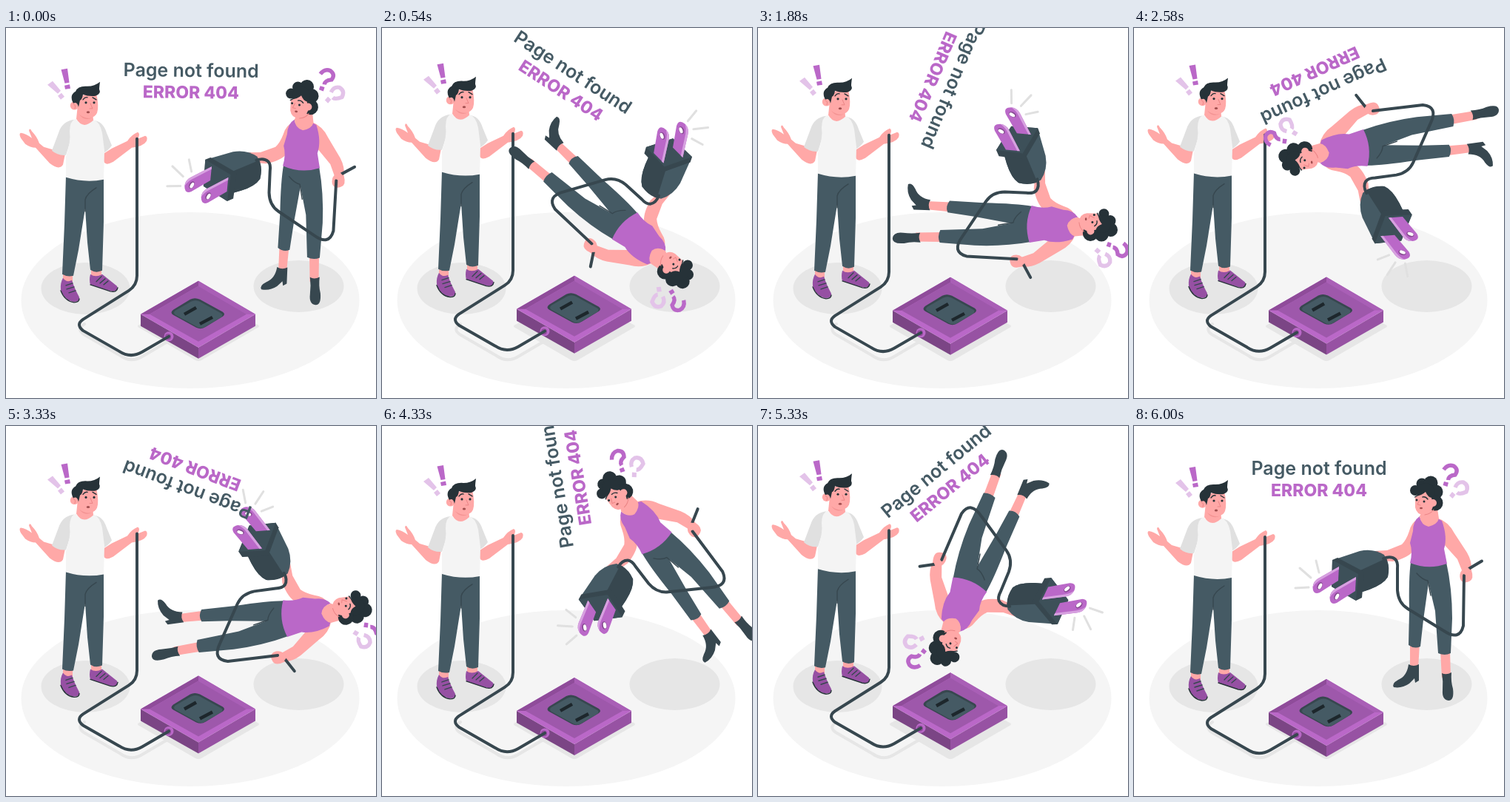
Recreate the animation shown at these times as an HTML page. Size 500 by 500 pixels, loop 6040 ms.

```html
<!DOCTYPE html>
<html lang="en">
<head>
<meta charset="utf-8">
<title>Page not found</title>
<style>
  html, body { margin: 0; width: 100%; height: 100%; overflow: hidden; background: #fff; }
  svg { display: block; width: 100%; height: 100%; }
  text { font-family: Inter, Roboto, sans-serif; text-anchor: middle; }
  .skin { fill: #ffa8a7; }
  .hair { fill: #263238; }
  .slate { fill: #455a64; }
  .deep { fill: #37474f; }
  .purple { fill: #ba68c8; }
  .pale { fill: #e3c3e9; }
  .shade { fill: #e6e6e6; }
  .sleeve { fill: #e0e0e0; }
  .shoe { fill: #9650a3; }
  .line { fill: none; stroke-linecap: round; stroke-linejoin: round; }
  .cord { stroke: #37474f; stroke-width: 4; }
  .crease { stroke: #37474f; stroke-width: 1.4; }
  .fine { stroke: #263238; stroke-width: 1.4; }
  .blush { stroke: #eb8586; stroke-width: 1; }
  .mark { fill: none; stroke-width: 5.4; }
</style>
</head>
<body>
<svg viewBox="0 0 500 500">
  <ellipse cx="249" cy="368" rx="228.5" ry="119" fill="#f5f5f5"/>
  <ellipse class="shade" cx="107.500" cy="352" rx="60" ry="35"/>
  <ellipse class="shade" cx="395.500" cy="349" rx="61" ry="35"/>
  <path class="shade" d="M180 401 L257 360 Q260 358 263 360 L340 401 Q344 403 340 405 L264 449 Q260 451 256 449 L180 405 Q176 403 180 401Z"/>
  <path class="line" stroke="#e6e6e6" stroke-width="4" d="M106 400 Q95 407 105 414 L155 443 Q169 453 184 444 L218 424"/>

  <g id="man">
    <path class="skin" d="M68 166 L51 161 L45 156 Q42 147 35 140 Q32 134 31 139 L35 149 Q27 143 20 142 Q17 143 20 149 L26 157 Q33 162 40 162 L59 183 Q72 193 77 185 L80 170Z"/>
    <path class="skin" d="M132 170 L132 180 Q134 187 145 181 L170 162 Q186 160 190 153 Q192 147 188 146 L178 150 Q182 143 178 141 Q170 144 164 153 L143 163Z"/>
    <path class="skin" d="M77 330 H90 V346 H77Z M115 325 H129 V340 H115Z"/>
    <g class="shoe">
      <path d="M77 338 Q73 345 74 354 Q78 367 90 370 Q100 371 99 364 Q92 351 89 341 Q82 345 77 338Z"/>
      <path d="M114 333 Q112 341 114 347 Q128 352 143 356 Q153 356 150 349 Q140 341 130 333 Q121 338 114 333Z"/>
    </g>
    <path class="line fine" d="M74 355 Q79 369 92 371 Q99 371 99 366 M114 347 L141 356 Q150 358 151 351"/>
    <path class="line crease" d="M81 348 L90 345 M82 353 L92 350 M85 358 L94 355 M122 343 L129 336 M127 345 L134 339 M132 347 L138 342"/>
    <path class="slate" d="M81 200 Q106 210 132 203 L132 262 L130 328 Q121 332 114 327 L110 290 L107 244 L98 300 L91 335 Q83 337 76 333 L79 265Z"/>
    <path class="line crease" d="M122 216 Q109 224 107 232 V248"/>
    <path class="sleeve" d="M92 124 Q76 126 71 142 L62 166 Q70 173 81 172 L88 150Z M118 125 Q131 126 136 142 L143 159 Q138 166 132 169 L126 150Z"/>
    <path fill="#f4f4f4" d="M94 123 Q104 137 118 124 Q127 127 130 142 L133 166 L132 205 Q107 210 81 202 L81 174 Q88 153 86 140 Q86 126 94 123Z"/>
    <path class="skin" d="M97 104 L95 123 Q104 138 118 125 L117 112Z"/>
    <path fill="#eb8586" opacity=".6" d="M99 117 Q106 123 114 122 L117 121 Q106 127 99 117Z"/>
    <path class="skin" d="M97 92 L122 88 Q126 107 123 115 Q120 122 112 121 Q102 119 98 111Z"/>
    <circle class="skin" cx="92.500" cy="105" r="5.700"/>
    <path class="hair" d="M91 102 Q85 91 94 86 Q97 78 110 79 Q120 79 127 73 Q126 80 126 83 Q129 89 121 92 Q111 93 104 90 Q103 97 100 98 L98 107 Q96 99 91 102Z"/>
    <path class="line fine" d="M104 97 Q107 93 110 94 M117 94 L122 97"/>
    <path class="line blush" d="M114 102 L117 109 L113 109 M91 103 Q95 104 93 109"/>
    <g class="hair"><circle cx="108" cy="101" r="1.6"/><circle cx="119" cy="101" r="1.6"/></g>
    <ellipse cx="111" cy="114" rx="2.200" ry="1.500" fill="#a24e4f"/>
    <path class="purple" d="M74.500 56.500 L83 55 L85.500 74 L79.500 75Z M79 78 L86 76.500 L87 82 L80 83Z"/>
    <path class="pale" d="M56 77 L63 72 L74 85 L70 89Z M70 92 L75 88 L79 93 L74 97Z"/>
  </g>

  <g id="socket">
    <path fill="#7b4585" d="M182 387 L260 432 V447 L182 403Z"/>
    <path fill="#9752a3" d="M337 387 L260 432 V447 L337 403Z"/>
    <path class="purple" d="M260 342 L337 387 L260 432 L182 387Z"/>
    <path fill="#8f4c9a" d="M260 342 L182 387 L194 387 L260 349Z"/>
    <path fill="#a95fb6" d="M260 342 L337 387 L325 387 L260 349Z"/>
    <path fill="#9e58ab" d="M260 349 L325 387 L260 424 L194 387Z"/>
    <path class="deep" d="M249 367 Q255 364 262 367 L293 384 Q297 387 293 390 L270 404 Q264 408 257 405 L226 388 Q221 385 226 381Z"/>
    <path class="slate" d="M250 370 Q256 367 262 370 L291 386 Q294 388 291 391 L269 404 Q264 407 258 404 L229 388 Q225 385 229 382Z"/>
    <path fill="none" stroke="#1d272c" stroke-width="4.500" d="M241 387 L257 378 M262 400 L279 391"/>
    <circle class="purple" cx="220" cy="417" r="6.500"/>
    <circle cx="219" cy="417.500" r="4" fill="#8f4c9a"/>
    <path class="line cord" d="M177 150 V335 Q177 348 166 355 L104 394 Q94 401 104 409 L153 437 Q168 447 184 438 L220 417"/>
  </g>

  <g id="woman">
    <path class="skin" d="M384 126 Q375 130 372 142 Q368 154 362 160 L342 168 L325 169 L322 176 L332 182 L350 183 Q371 178 378 168 L386 150Z"/>
    <path class="skin" d="M373 294 H386 L384 328 H373Z M414 304 H427 L428 340 H416Z"/>
    <g class="deep">
      <path d="M371 322 Q378 326 385 322 L385 344 L380 347 L379 341 L372 348 Q362 355 351 353 Q348 348 357 343 Q369 338 371 322Z"/>
      <path d="M416 334 Q422 337 429 333 Q428 345 431 355 Q433 371 425 371 Q416 370 417 357 Q418 345 416 334Z"/>
    </g>
    <path class="slate" d="M374 184 Q398 194 422 184 Q430 220 430 260 L428 307 Q420 311 411 307 L407 250 L398 212 L391 262 L387 298 Q379 302 371 296 L372 250 Q371 205 374 184Z"/>
    <path class="line crease" d="M382 199 Q390 208 397 209 L401 229"/>
    <path class="skin" d="M409 124 Q425 129 433 145 L450 171 Q457 183 456 195 Q460 207 453 210 Q444 214 441 207 Q439 200 443 195 L437 180 L419 160Z"/>
    <path class="purple" d="M386 122 Q377 128 377 142 L373 158 Q377 170 373 185 Q398 195 423 186 L419 166 Q424 150 416 128 L410 125 Q407 132 397 135 Q388 132 386 122Z"/>
    <path class="skin" d="M391 112 L386 122 Q388 134 398 136 Q410 133 412 125 L409 105Z"/>
    <g transform="translate(0 -2)">
      <g class="hair">
        <circle cx="380" cy="89" r="7"/><circle cx="389" cy="80" r="7.500"/>
        <circle cx="401" cy="79" r="9.500"/><circle cx="408" cy="91" r="9.500"/>
        <circle cx="407" cy="106" r="10.500"/><circle cx="394" cy="91" r="12"/>
      </g>
      <path class="skin" d="M380 97 Q389 96 394 91 Q397 98 402 99 L404 111 Q401 121 392 122 Q382 122 380 112Z"/>
      <circle class="skin" cx="404" cy="106" r="5"/>
      <path class="line fine" d="M379.500 98 L383 96 M390 98 Q394 97 397 101"/>
      <path class="line blush" d="M386 102 L383 108 L387 109 M393 122 Q401 121 405 115"/>
      <g class="hair"><circle cx="382" cy="102" r="1.500"/><circle cx="392" cy="104" r="1.500"/></g>
      <ellipse cx="388" cy="113" rx="2" ry="1.300" fill="#a24e4f"/>
    </g>

    <path class="slate" d="M275 179 L305 169 Q323 165 338 174 Q346 186 343 204 Q337 214 318 221 L306 225Z"/>
    <path class="deep" d="M306 195 L336 181 Q342 178 342 181 Q346 192 343 204 Q337 214 318 221 L306 225Z"/>
    <path class="deep" d="M268 181 L275 178 L311 197 L308 232 L300 236 L267 217Z"/>
    <path fill="#3d5059" d="M268 181 L303 200 L300 236 L267 217Z"/>
    <g id="prong">
      <path class="purple" d="M277 190 L276 209 L251 225 Q242 229 241.500 218 Q242 210 249 206Z"/>
      <path fill="#d7a1e0" d="M277 190 L249 206 Q242 210 241.500 218 Q245 212 251 208.500 L277 193.500Z"/>
      <ellipse cx="251" cy="216" rx="3.300" ry="5.300" transform="rotate(28 251 216)" fill="#874a92"/>
      <ellipse cx="251.500" cy="216.500" rx="2.200" ry="4.200" transform="rotate(28 251.500 216.500)" fill="#fff"/>
    </g>
    <use href="#prong" x="23" y="14"/>
    <path class="line" stroke="#e0e0e0" stroke-width="3" d="M224 192 L239 205 M246 182 L250 198 M218 219 L236 218"/>
    <path class="line cord" d="M337 179 Q347 175 353 180 Q357 184 356 193 L356 222 Q357 239 370 247 L419 277 Q440 291 445 270 L446 202 M449 195 L470 182.500"/>
    <path class="skin" d="M450 190 Q444 193 443 199 L448 201 L456 196Z"/>
    <path class="mark" stroke="#ba68c8" d="M418.500 59 Q424 51 432 54 Q439 59 434 66 Q425 67 424.500 73"/>
    <path class="purple" d="M419 75 L425 76.500 L423.500 82 L417.500 80Z"/>
    <path class="mark" stroke="#e3c3e9" d="M434 83 Q437 75 445 76 Q453 80 449 89 Q440 93 436.500 90"/>
    <path class="pale" d="M430 89 L434.500 93 L430.500 98 L426 94Z"/>
  </g>

  <g id="title">
    <text class="slate" x="250" y="66" font-size="25" font-weight="600">Page not found</text>
    <text class="purple" x="250" y="95" font-size="23" font-weight="800">ERROR 404</text>
  </g>
</svg>
<script>
  const LOOP = 6040, TITLE_TURN = 6000, BEAT = 1500, LEAD = 10;
  const STEP = 1000 / 24;
  const byId = id => document.getElementById(id);
  const place = (id, transform) => byId(id).setAttribute('transform', transform);
  const spin = (time, period, x, y) => `rotate(${360 * time / period} ${x} ${y})`;

  // Linear rise of 10 units and back, once per beat.
  const lift = time => {
    const phase = time % BEAT / BEAT;
    return -10 * (1 - Math.abs(1 - 2 * phase));
  };

  // Poses are held at 24 per second; the small slack absorbs delays rounded to 10 ms.
  const poseTime = elapsed => {
    const step = Math.floor(elapsed % LOOP / STEP + 0.15);
    return Math.min(step * STEP + LEAD, TITLE_TURN);
  };

  function render(elapsed) {
    const time = poseTime(elapsed);
    const hover = `translate(0 ${lift(time)})`;
    place('man', hover);
    place('socket', hover);
    place('woman', spin(time, BEAT, 345, 211));
    place('title', spin(time, TITLE_TURN, 250, 72));
  }

  const start = performance.now();
  function tick() {
    render(performance.now() - start);
    requestAnimationFrame(tick);
  }
  tick();
</script>
</body>
</html>
```
